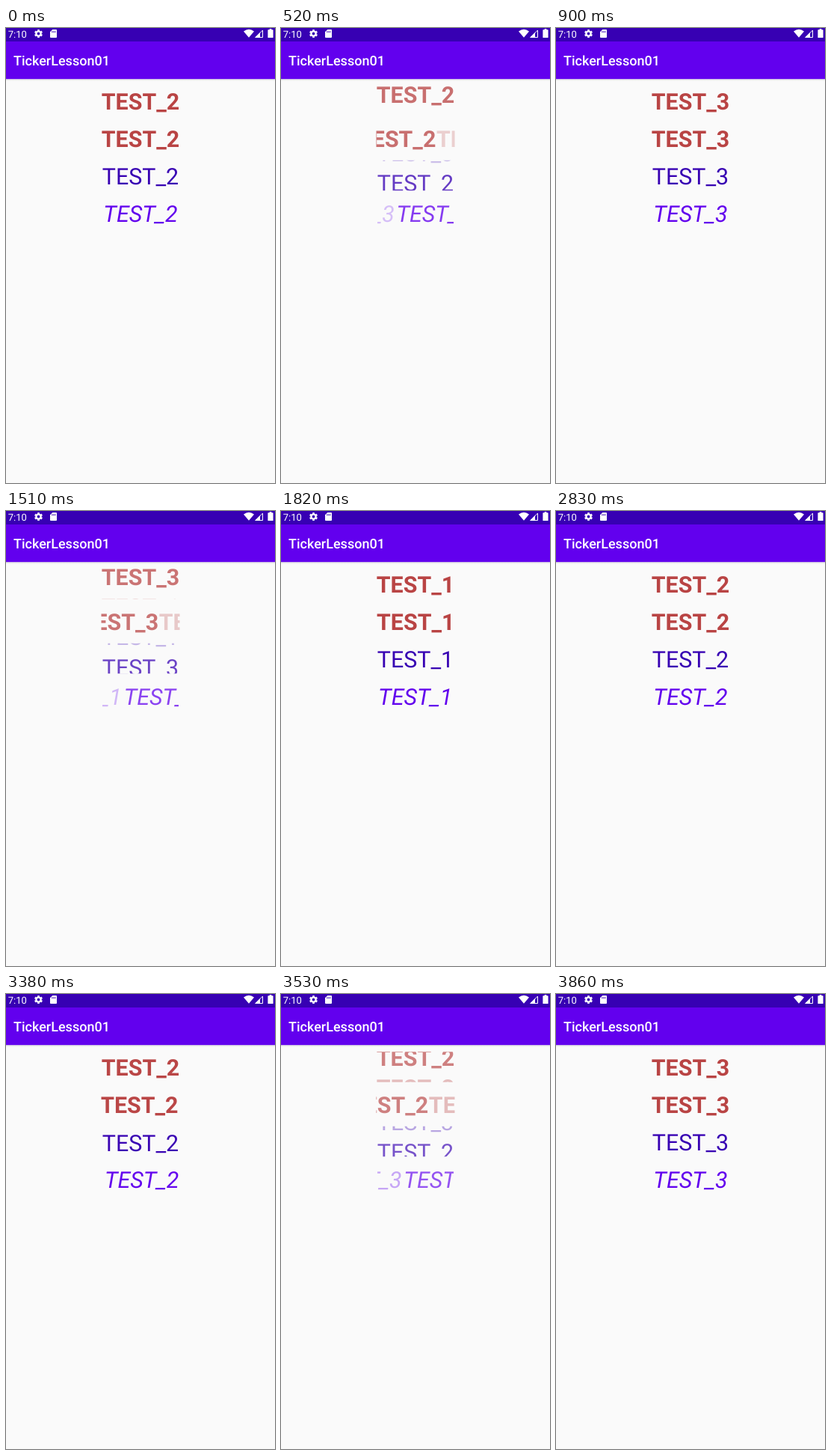
An HTML page that plays this animation: 360 by 608 pixels, repeating every 3.93 s.

```html
<!DOCTYPE html>
<html lang="en">
<head>
<meta charset="utf-8">
<style>
  html, body { margin: 0; width: 100%; height: 100%; overflow: hidden; background: #fafafa; }
  svg { display: block; font-family: Roboto, sans-serif; text-rendering: geometricPrecision; }
  svg svg { overflow: hidden; }
  #rows text { font-size: 30.4px; text-anchor: middle; }
</style>
</head>
<body>
<svg id="stage" width="360" height="608" viewBox="0 0 360 608">
  <defs>
    <linearGradient id="shade" x2="0" y2="1">
      <stop stop-color="#000" stop-opacity=".11"/>
      <stop offset="1" stop-color="#000" stop-opacity="0"/>
    </linearGradient>
  </defs>
  <rect width="360" height="608" fill="#fafafa"/>
  <rect y="68" width="360" height="3" fill="url(#shade)"/>
  <rect width="360" height="68.2" fill="#6200ee"/>
  <rect width="360" height="18" fill="#3700b3"/>

  <g fill="#fff">
    <text x="2.7" y="12.5" font-size="13">7:10</text>
    <text x="10" y="50" font-size="18" font-weight="500">TickerLesson01</text>
    <!-- settings, memory card -->
    <g fill="none" stroke="#fff">
      <circle cx="43.5" cy="7.5" r="3.1" stroke-width="2.4"/>
      <circle cx="43.5" cy="7.5" r="4.7" stroke-width="1.7" pathLength="12" stroke-dasharray="1.1 .9" stroke-dashoffset="-.45"/>
    </g>
    <path d="M62.3 2H67q1 0 1 1v9q0 1-1 1h-7q-1 0-1-1V5.3Z"/>
    <path d="M61.8 4.2v2M63.8 4.2v2M65.8 4.2v2" stroke="#3700b3"/>
    <!-- wifi, signal, battery -->
    <path d="M318 4.5Q325 -1 332 4.5L325 12.700Z"/>
    <path d="M343.500 3v9.500H334Z" fill="none" stroke="#fff"/>
    <path d="M340 6v7h-7Z"/>
    <path d="M352.700 1h2.600v1.200h1.700q.6 0 .6.6v9.700q0 .6-.6.6h-6q-.6 0-.6-.6V2.800q0-.6.6-.6h1.700Z"/>
  </g>
  <g id="rows"></g>
</svg>
<script>
const LOOP = 3930, HOLD = 350, STEP = 77.8, PERIOD = 1000, MOVE = 500;
const TOP = 77.2, PITCH = 49.75, HEIGHT = 40.5, BASELINE = 32.2;
const NS = 'http://www.w3.org/2000/svg';

// dx, dy: direction in which the old label leaves
const rows = [
  { dx: 0, dy: -1, width: 105, fill: '#b94444', 'font-weight': 700 },
  { dx: -1, dy: 0, width: 105, fill: '#b94444', 'font-weight': 700 },
  { dx: 0, dy: 1, width: 102, fill: '#3700b3' },
  { dx: 1, dy: 0, width: 102, fill: '#6200ee', 'font-style': 'italic' }
];

function add(parent, tag, attrs) {
  const el = parent.appendChild(document.createElementNS(NS, tag));
  for (const key in attrs) el.setAttribute(key, attrs[key]);
  return el;
}

rows.forEach((row, i) => {
  const { dx, dy, width, ...style } = row;
  const box = add(document.getElementById('rows'), 'svg',
    { x: 180 - width / 2, y: TOP + PITCH * i, width, height: HEIGHT });
  row.labels = [add(box, 'text', style), add(box, 'text', style)];
});

function place(label, row, value, shift, alpha) {
  label.textContent = 'TEST_' + value;
  label.setAttribute('x', row.width / 2 + row.dx * shift * row.width);
  label.setAttribute('y', BASELINE + row.dy * shift * HEIGHT);
  label.setAttribute('opacity', alpha);
}

function draw(time) {
  // The screen refreshes in coarse steps; a new label arrives every second.
  const tick = Math.floor((time - HOLD) / STEP + 0.15);
  const clock = tick < 0 ? 0 : tick * STEP + 6;
  const index = Math.floor(clock / PERIOD);
  const t = Math.min(1, (clock % PERIOD) / MOVE);
  const p = (1 - Math.cos(Math.PI * t)) / 2;
  for (const row of rows) {
    place(row.labels[0], row, (index + 1) % 3 + 1, p, 1 - p);
    place(row.labels[1], row, (index + 2) % 3 + 1, p - 1, p);
  }
}

const start = performance.now();
function frame() {
  draw((performance.now() - start) % LOOP);
  requestAnimationFrame(frame);
}
frame();
</script>
</body>
</html>
```
